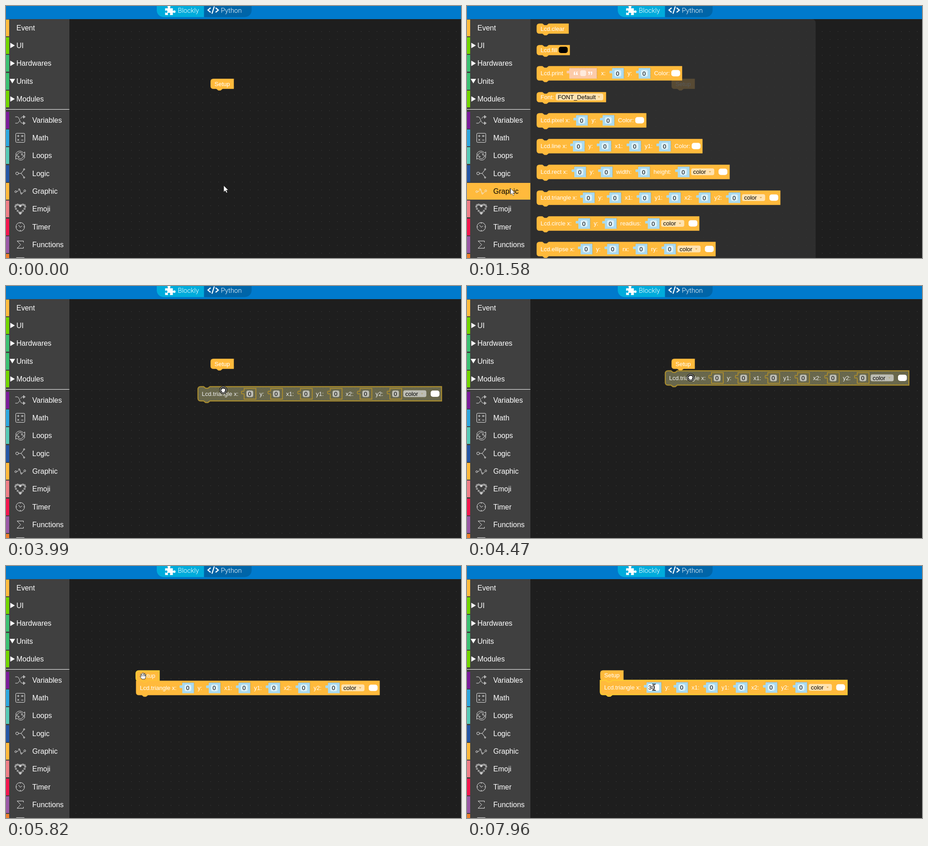
Animation, 1005 px wide and 557 px high, one loop 8 s. Source, as an HTML page with a canvas:

```html
<!DOCTYPE html>
<html lang="en">
<head>
<meta charset="utf-8">
<title>Block editor</title>
<style>
html, body { margin: 0; width: 100%; height: 100%; overflow: hidden; background: #1e1e1e; }
canvas { display: block; }
</style>
</head>
<body>
<canvas id="stage" width="1005" height="557"></canvas>
<script>
const ctx = document.getElementById('stage').getContext('2d');
const LOOP = 8000;
const SANS = '"Liberation Sans", Arial, sans-serif';
const BLOCK_FONT = '13px ' + SANS;

// The picture only changes at these moments: [start, count], 120 ms apart.
const bursts = [[500, 7], [1340, 3], [2610, 3], [3000, 7], [3870, 7],
                [4710, 3], [5100, 7], [5970, 5], [6700, 3], [7720, 3]];
const steps = [0, ...bursts.flatMap(([start, n]) =>
  Array.from({ length: n }, (_, i) => start + 120 * i))];

// Motion paths: [time, x, y]
const cursorPath = [[380, 481, 397], [980, 125, 376], [1220, 96, 403], [2490, 96, 403],
  [2850, 238, 431], [3000, 239, 432], [3360, 244, 440], [3600, 377, 375], [3720, 350, 364],
  [3990, 480, 230], [4350, 494, 202], [4590, 494, 202], [4950, 468, 173], [4980, 468, 173],
  [5820, 303, 243], [6210, 360, 300], [6450, 408, 271], [6940, 413, 268]];
const trianglePath = [[2880, 154, 408], [3360, 160, 416.5], [3600, 293, 352],
  [3720, 294.5, 353], [3990, 424, 222.5], [4350, 438, 187.5]];
const setupPath = [[4980, 452, 161], [5820, 287.3, 231.8], [5970, 294.5, 230.8]];

const themes = {
  normal: { body: '#ffba3c', cell: '#a9daf0', field: 'rgba(255,255,255,.6)', text: '#fff', edge: '#ffcc33' },
  drag: { body: '#d09b37', cell: '#92b7c4', field: 'rgba(255,255,255,.6)', text: '#fff', edge: '#d8ad32' },
  disabled: { body: '#66654f', cell: '#66654f', field: '#bdbdb4', text: '#eee', edge: '#a88b2f' }
};

// Value blocks: [top, first label, distance to first value, other labels, has menu]
const triangle = [408, 'Lcd.triangle x:', 105, ['y:', 'x1:', 'y1:', 'x2:', 'y2:'], true];
const valueBlocks = [
  [133, 'Lcd.print', 111, ['x:', 'y:'], false],
  [237, 'Lcd.pixel x:', 90, ['y:'], false],
  [294, 'Lcd.line x:', 83, ['y:', 'x1:', 'y1:'], false],
  [351, 'Lcd.rect x:', 86, ['y:', 'width:', 'height:'], true],
  [465, 'Lcd.circle x:', 95, ['y:', 'readius:'], true],
  [521.5, 'Lcd.ellipse x:', 100, ['y:', 'rx:', 'ry:'], true]
];

const groups = [['Event', '#ffbd3e'], ['UI', '#73d700'], ['Hardwares', '#3cc273'],
                ['Units', '#3cc273'], ['Modules', '#73d700']];
const categories = [
  ['Variables', '#7b1c9b', 'M-11-7H-7C-1-7-2 7 5 7H10M-11 7H-7C-4 7-3 4-2 2M1-3C2-5 3-7 5-7H10M7-10L11-7L7-4ZM7 4L11 7L7 10Z'],
  ['Math', '#2ea8e0', 'M-8-10H8Q10-10 10-8V8Q10 10 8 10H-8Q-10 10-10 8V-8Q-10-10-8-10M-7-4H-2M-4.5-6.5V-1.5M2-5H7M2-3H7M-6.5 2.5L-2.5 6.5M-2.5 2.5L-6.5 6.5M2 5H7'],
  ['Loops', '#57cbb8', 'M-10-2C-9-10 1-13 7-6L10-8V0L2-2L5-4C1-9-5-7-6-2ZM10 2C9 10-1 13-7 6L-10 8V0L-2 2L-5 4C-1 9 5 7 6 2Z'],
  ['Logic', '#2456a5', 'M-4 0A3 3 0 1 1-10 0A3 3 0 1 1-4 0H2L8-8M2 0L8 8M10-9A1.5 1.5 0 1 1 7-9A1.5 1.5 0 1 1 10-9M10 9A1.5 1.5 0 1 1 7 9A1.5 1.5 0 1 1 10 9'],
  ['Graphic', '#ffba3c', 'M-8 1A2 2 0 1 1-12 1A2 2 0 1 1-8 1L-4-1M-1-4A1.5 1.5 0 1 1-4-4A1.5 1.5 0 1 1-1-4L1 4M4 5A1.5 1.5 0 1 1 1 5A1.5 1.5 0 1 1 4 5L8 1M12-1A2 2 0 1 1 8-1A2 2 0 1 1 12-1'],
  ['Emoji', '#f07f87', null],
  ['Timer', '#f4184f', 'M9.5 0A9.5 9.5 0 1 1-9.5 0A9.5 9.5 0 1 1 9.5 0M-4-4L0 1L4-2M0-9V-7M0 7V9M-9 0H-7M7 0H9'],
  ['Functions', '#9b59a5', 'M7-5V-8H-7L1 0L-7 8H7V5'],
  ['', '#ee7f2e', 'M-9-10.5H9']
];
const rowY = i => 252 + 39.35 * i;

function along(path, t) {
  const next = path.findIndex(p => p[0] > t);
  if (next === 0) return path[0].slice(1);
  if (next < 0) return path.at(-1).slice(1);
  const [a, b] = [path[next - 1], path[next]];
  const k = (t - a[0]) / (b[0] - a[0]);
  return [1, 2].map(i => a[i] + (b[i] - a[i]) * k);
}

function text(s, x, y, color = '#fff', font = BLOCK_FONT) {
  ctx.font = font;
  ctx.fillStyle = color;
  ctx.fillText(s, x, y);
}

function rect(x, y, w, h, color, radius = 0) {
  ctx.fillStyle = color;
  ctx.beginPath();
  ctx.roundRect(x, y, w, h, radius);
  ctx.fill();
}

function drawPath(d, x, y, fill, stroke, width = 1) {
  ctx.save();
  ctx.translate(x, y);
  const path = new Path2D(d);
  if (fill) { ctx.fillStyle = fill; ctx.fill(path); }
  if (stroke) { ctx.strokeStyle = stroke; ctx.lineWidth = width; ctx.stroke(path); }
  ctx.restore();
}

function body(x, y, w, h, theme, { selected, notch = true, squareTop } = {}) {
  const top = squareTop ? 'M0 0' : 'M0 6Q0 0 6 0';
  const d = top + (notch ? 'H12.5L17 3.5H22L26.5 0' : '') +
    `H${w}V${h}H26.5L22 ${h + 3.5}H17L12.5 ${h}H6Q0 ${h} 0 ${h - 6}Z`;
  drawPath(d, x, y, theme.body, selected ? theme.edge : theme.body, selected ? 2.4 : 0.5);
  if (theme !== themes.disabled) return;
  ctx.save();
  ctx.translate(x, y);
  ctx.clip(new Path2D(d));
  ctx.strokeStyle = 'rgba(135,135,30,.3)';
  ctx.lineWidth = 0.7;
  ctx.beginPath();
  for (let i = -35; i < w + 35; i += 7) {
    ctx.moveTo(i, 0); ctx.lineTo(i + 35, 35);
    ctx.moveTo(i, 0); ctx.lineTo(i - 35, 35);
  }
  ctx.stroke();
  ctx.restore();
}

function cell(x, y, w, theme, color = theme.cell) {
  const disabled = theme === themes.disabled;
  drawPath(`M0 0H${w}V23.5H0V14C0 8-6 16-6 9S0 10 0 3.5Z`, x, y, disabled ? null : color,
    disabled ? theme.edge : null, 2);
  if (disabled) return;
  ctx.setLineDash([2, 1.5]);
  drawPath(`M0 0H${w}V23.5`, x, y, null, 'rgba(60,50,30,.45)', 0.8);
  ctx.setLineDash([]);
}

function menu(x, y, w, label, theme) {
  rect(x, y - 7.5, w, 15, theme.field, 4);
  text(label, x + 4.5, y + 4.5, '#000');
  drawPath('M-2.5-1.5H2.5L0 2Z', x + w - 9.5, y, theme === themes.disabled ? '#b3ab85' : '#e0ad55');
}

function valueBlock(x, y, [, label, firstGap, labels, hasMenu], theme = themes.normal, options = {}) {
  const value = options.value ?? '0';
  const extra = 7 * (value.length - 1);
  const values = [9 + firstGap];
  const labelXs = [];
  let at = values[0] + extra;
  ctx.font = BLOCK_FONT;
  for (const name of labels) {
    labelXs.push(at + 22);
    at += 22 + ctx.measureText(name).width + 26.5;
    values.push(at);
  }
  const swatch = at + (hasMenu ? 78 : 60);
  const mid = y + 15.5;
  body(x, y, Math.round(swatch + 24), 31.5, theme, options);
  text(label, x + 8.5, mid + 4.5, theme.text);
  labels.forEach((name, i) => text(name, x + labelXs[i], mid + 4.5, theme.text));
  values.forEach((v, i) => {
    const cx = x + v;
    if (i === 0 && label === 'Lcd.print') {
      cell(x + 72, y + 4, 61, theme, '#fccba9');
      rect(x + 96, mid - 6.5, 13, 13, theme.field, 4);
      text('“', x + 80, mid + 14, '#fff', 'bold 25px ' + SANS);
      text('”', x + 112, mid + 14, '#fff', 'bold 25px ' + SANS);
      return;
    }
    const grow = i === 0 ? extra : 0;
    cell(cx - 12, y + 4, 26 + grow, theme);
    if (i === 0 && options.editing) rect(cx - 9, mid - 7, 18 + grow, 14.5, '#fff', 3);
    else rect(cx - 7, mid - 7, 15, 14.5, theme.field, 4);
    text(i === 0 ? value : '0', cx - (grow ? 8 : 3.6), mid + 5, '#000');
  });
  if (hasMenu) menu(x + at + 17.5, mid, 51, 'color', theme);
  else text('Color:', x + at + 22, mid + 4.5);
  rect(x + swatch, mid - 7, 19.5, 14, '#fff', 5);
}

function setup(x, y, theme, selected) {
  body(x, y, 51, 22, theme, { selected, notch: false });
  text('Setup', x + 8.5, y + 15.5);
}

function header() {
  rect(0, 0, 1005, 29, '#007acc');
  rect(333, -20, 104.5, 44.5, '#00acdc', [0, 0, 0, 15]);
  rect(437.5, -20, 105, 44.5, '#0065a8', [0, 0, 15, 0]);
  drawPath('M0 5H6C7 5 6.5 4 5.5 3C4.5 0 7-1 8.5-1C10-1 12.5 0 11.5 3C10.5 4 10 5 11 5H17V10C17 11 18 11 19 10C22 9 23 10.5 23 12.5C23 14.5 22 16 19 15C18 14 17 14 17 15V20H11C10 20 10.5 19 11 18C12 16 10 15 8.5 15C7 15 5 16 6 18C6.5 19 7 20 6 20H0V15C0 14 1 14 2 15C4 16 5 14.5 5 12.5C5 10.5 4 9 2 10C1 11 0 11 0 10Z', 351.5, 0, '#fff');
  drawPath('M7 4L1 9L7 14M18 4L24 9L18 14M15 1L10 17', 445, 0, null, '#fff', 2.3);
  const font = '300 15px Roboto, sans-serif';
  text('Blockly', 379.5, 15, '#fff', font);
  text('Python', 474.5, 15, '#fff', font);
}

function heartIcon(x, y) {
  ctx.strokeStyle = '#eee';
  ctx.lineWidth = 0.8;
  for (let i = 0; i < 20; i++) {
    const a = i * Math.PI / 10;
    const px = 11 * Math.sin(a) ** 3;
    const py = -(9.5 * Math.cos(a) - 3.6 * Math.cos(2 * a) - 1.4 * Math.cos(3 * a));
    ctx.strokeRect(x + px - 1.3, y + py - 3, 2.6, 2.6);
  }
}

function sidebar(hoverY, graphicOpen) {
  const font = '16px ' + SANS;
  rect(0, 29, 140, 528, '#404040');
  groups.forEach(([name, color], i) => {
    const y = 48 + 39.35 * i;
    rect(0, Math.round(y - 18.5), 7, 37, color);
    text(name, 23, y + 5.5, '#fff', font);
    if (name === 'Units') drawPath('M8-5H20L14 5Z', 0, y, '#fff');
    else if (i) drawPath('M9.5-6L19.5 0L9.5 6Z', 0, y, '#fff');
  });
  rect(0, 228, 140, 1, '#fff');
  categories.forEach(([name, color, icon], i) => {
    const y = rowY(i);
    const top = Math.round(y - 18.5);
    const active = name === 'Graphic' && graphicOpen;
    if (Math.abs(hoverY - y) < 18.5) rect(7, top, 133, 37, '#565656');
    rect(0, top, active ? 140 : 7, 37, color);
    if (icon) drawPath(icon, 31.5, y, null, '#eee', 1);
    else heartIcon(31.5, y);
    text(name, 58, y + 5.5, active ? '#000' : '#fff', font);
  });
}

function workspace() {
  rect(140, 29, 865, 528, '#1e1e1e');
  for (let x = 154; x < 1005; x += 17.5)
    for (let y = 56; y < 557; y += 17.5) rect(x, y, 1, 1, '#505050');
}

function flyout(triangleSelected) {
  const theme = themes.normal;
  rect(140, 29, 630, 540, 'rgba(50,50,50,.82)', [0, 8, 0, 0]);
  body(154, 39, 70.5, 22, theme);
  text('Lcd.clear', 162.5, 54.5);
  body(154, 86.5, 73, 22, theme);
  text('Lcd.fill', 162.5, 102);
  rect(202.5, 90, 20, 14, '#000', 5);
  body(154, 190.5, 153, 22, theme);
  text('Font:', 162.5, 206);
  menu(196, 201, 105, 'FONT_Default', theme);
  valueBlocks.forEach(spec => valueBlock(154, spec[0], spec));
  valueBlock(154, triangle[0], triangle, theme, { selected: triangleSelected });
}

const cursors = {
  arrow: (x, y) => drawPath('M0 0V14L3.3 11L5.8 16L8 15L5.6 10H10Z', x, y, '#fff', '#222', 0.6),
  hand: (x, y) => drawPath('M-3 7L-7 1Q-7-1-4 1L-6-4Q-5-6-3-2L-2-6Q0-8 1-6V-2L3-6Q5-6 4-3L4 0L5-3Q7-3 6 0L4 7ZM-2-2V1M1-2V1M4-2V1', x, y, '#fff', '#222', 0.9),
  fist: (x, y) => {
    drawPath('M8 0A8 8 0 1 1-8 0A8 8 0 1 1 8 0', x, y, '#222', '#111', 1.5);
    drawPath('M7 0A7 7 0 1 1-7 0A7 7 0 1 1 7 0', x, y, null, '#e8e8e0', 1);
    drawPath('M-2 5L-5 0Q-4-2-3-1V-3Q-2-4-1-3Q1-4 2-3Q4-3 4-1V1L2 5Z', x, y, '#fff');
  },
  beam: (x, y) => drawPath('M-4-7H-1L0-6L1-7H4M0-6V6M-4 7H-1L0 6L1 7H4', x, y, null, '#111', 1.3)
};

function cursorKind(t) {
  if (t < 2730) return 'arrow';
  if ((t >= 3000 && t < 4590) || (t >= 5100 && t < 5820)) return 'fist';
  return t < 6450 ? 'hand' : 'beam';
}

function draw(t) {
  const open = t >= 1340 && t < 3000;
  const draggingStack = t >= 5100 && t < 5820;
  const [cx, cy] = along(cursorPath, t);
  const [sx, sy] = along(setupPath, t);
  const stackTheme = draggingStack ? themes.drag : themes.normal;

  workspace();
  setup(sx, sy, stackTheme, t >= 5100 && t < 6700);
  if (open) flyout(t >= 2850);
  if (t >= 3000 && t < 4590) {
    const theme = t < 3600 ? themes.drag : themes.disabled;
    valueBlock(...along(trianglePath, t), triangle, theme, { selected: true });
  } else if (t >= 4590) {
    valueBlock(sx, sy + 22, triangle, stackTheme, {
      selected: t < 5100 || t >= 6700,
      squareTop: true,
      editing: t >= 6820,
      value: t >= 7840 ? '30' : t >= 7720 ? '3' : '0'
    });
  }
  header();
  sidebar(cx < 140 && t < 1340 ? cy : -99, open);
  cursors[cursorKind(t)](cx, cy);
}

const start = performance.now();
function frame() {
  const t = (performance.now() - start) % LOOP;
  draw(steps.findLast(s => s <= t));
  requestAnimationFrame(frame);
}
frame();
</script>
</body>
</html>
```
